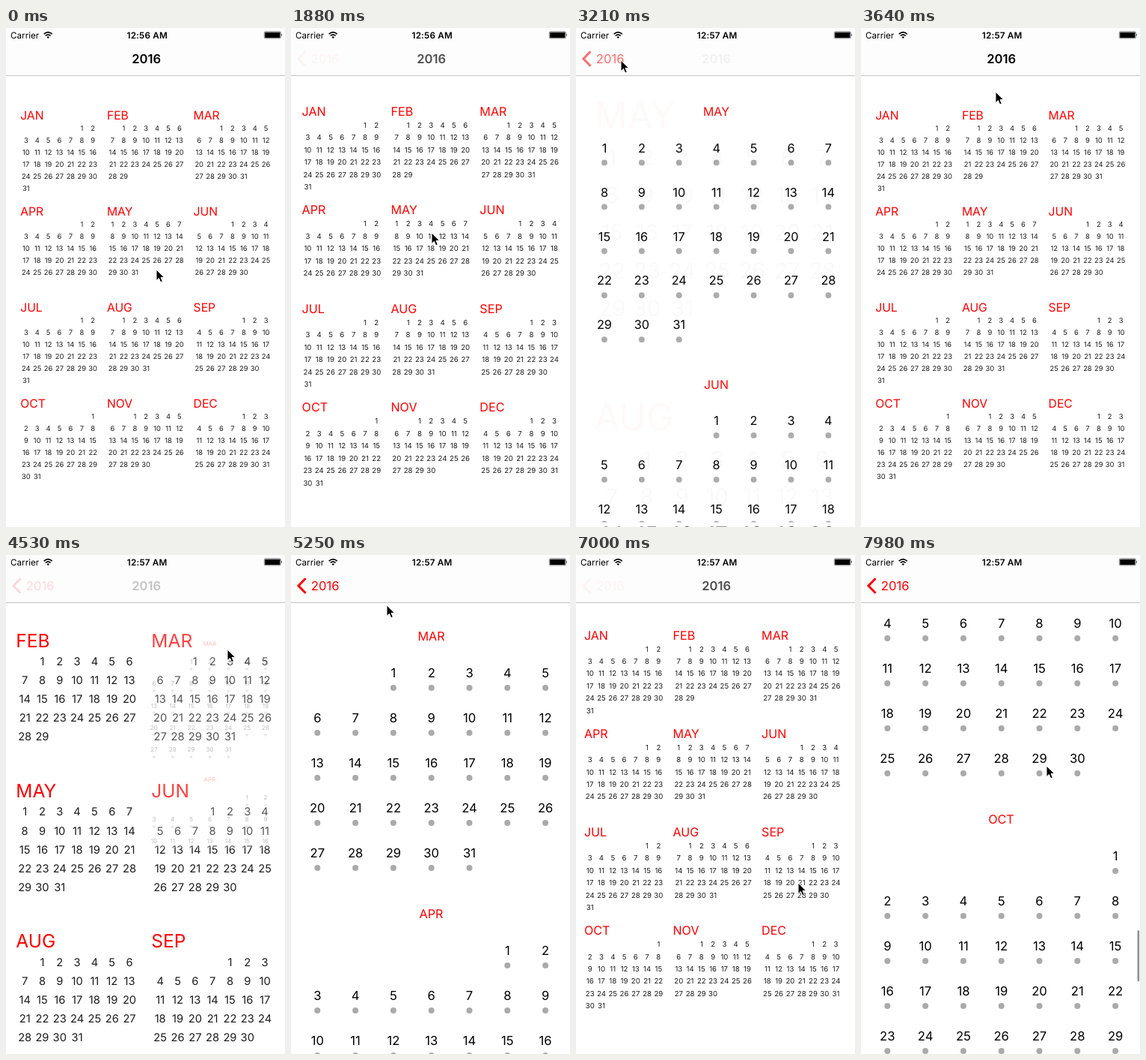
An HTML page that plays this animation: 373x665 px, repeating every 8000 ms.

```html
<!DOCTYPE html>
<html lang="en">
<head>
<meta charset="utf-8">
<title>Year calendar</title>
<style>
  html, body { margin: 0; width: 100%; height: 100%; overflow: hidden; background: #fff; }
  svg { display: block; width: 100vw; height: 100vh; }
  text { font-family: Inter, "Noto Sans", sans-serif; text-rendering: geometricPrecision; }
  .day { text-anchor: middle; }
  .small .day { font-size: 9.4px; fill: #1c1c1c; }
  .small .name { font-size: 15.7px; fill: #f00; }
  .large .day { font-size: 16.6px; }
  .large .name { font-size: 16.2px; fill: #f00; text-anchor: middle; }
  .large circle { fill: #aaa; }
  .bar { font-size: 16.6px; }
  .status { font-size: 11.7px; }
</style>
</head>
<body>
<svg viewBox="0 0 373 665">
  <defs>
    <clipPath id="page"><rect y="64" width="373" height="601"/></clipPath>
  </defs>
  <rect width="373" height="665" fill="#fff"/>
  <g id="year" class="small"></g>
  <g id="months" class="large"></g>
  <rect id="scroller" x="369.5" width="2.6" height="68" rx="1.3" fill="#909090"/>

  <rect width="373" height="63.5" fill="#fdfdfd"/>
  <rect y="63" width="373" height="1" fill="#c4c4c4"/>
  <g class="status">
    <text x="6" y="13.6">Carrier</text>
    <text id="clock" x="188.7" y="13.6" text-anchor="middle" font-weight="600" letter-spacing=".2"></text>
  </g>
  <g fill="none" stroke="#000" stroke-width="1.7">
    <path d="M50.7 8.2Q56.2 3.2 61.7 8.2"/>
    <path d="M52.8 10.4Q56.2 7.4 59.6 10.4"/>
  </g>
  <path d="M54.4 11.9Q56.2 10.4 58 11.9L56.2 13.9Z"/>
  <rect x="345.3" y="4.8" width="22" height="9" rx="1.6" fill="none" stroke="#000" stroke-width=".5"/>
  <rect x="346.2" y="5.7" width="20.2" height="7.2" rx=".6"/>
  <path d="M368.2 7.6q1.6 1.7 0 3.4z"/>
  <g class="bar">
    <text id="title" x="187.7" y="47" text-anchor="middle" font-weight="600">2016</text>
    <g id="back" fill="#f00">
      <path d="M19.5 31.3L10 41L19.5 50.7" fill="none" stroke="#f00" stroke-width="3"/>
      <text x="26.8" y="47">2016</text>
    </g>
  </g>
  <path id="cursor" d="M0 0V14.6L3.4 11.4L5.7 16.8L8.3 15.7L6 10.4H10.6Z"
        stroke="#fff" stroke-width="1" stroke-linejoin="round"/>
</svg>
<script>
const LOOP = 8000, STEP = 88.4;   // the picture advances in steps
const ZOOM_MS = 480, RATIO = 3.2;
const NAMES = 'JAN FEB MAR APR MAY JUN JUL AUG SEP OCT NOV DEC'.split(' ');
const $ = id => document.getElementById(id);

function add(parent, tag, attrs, text = '') {
  const el = document.createElementNS('http://www.w3.org/2000/svg', tag);
  for (const key in attrs) el.setAttribute(key, attrs[key]);
  el.textContent = text;
  return parent.appendChild(el);
}

// Calls draw(day, column, row) for each day and returns the number of rows.
function eachDay(month, draw) {
  const first = new Date(2016, month, 1).getDay();
  const count = new Date(2016, month + 1, 0).getDate();
  for (let d = 1; d <= count; d++) {
    const cell = first + d - 1;
    draw(d, cell % 7, Math.floor(cell / 7));
  }
  return Math.ceil((first + count) / 7);
}

function buildYear() {
  NAMES.forEach((name, m) => {
    const x = 20 + 115.7 * (m % 3), y = 116 + 128 * Math.floor(m / 3);
    add($('year'), 'text', { class: 'name', x: x - .8, y: y + 5.8 }, name);
    eachDay(m, (d, col, row) => add($('year'), 'text',
      { class: 'day', x: x + 6.8 + 14.9 * col, y: y + 21.4 + 16 * row }, d));
  });
}

function buildMonths(start) {
  const layer = add($('months'), 'g', { 'clip-path': 'url(#page)' });
  add(layer, 'rect', { y: 64, width: 373, height: 601, fill: '#fff' });
  const list = add(layer, 'g', {});
  let y = 108;
  for (let m = start; m < start + 3; m++) {
    add(list, 'text', { class: 'name', x: 187.5, y: y + 5.9 }, NAMES[m]);
    const rows = eachDay(m, (d, col, row) => {
      const x = 35.3 + 50.8 * col, cy = y + 49 + 60 * row;
      add(list, 'text', { class: 'day', x, y: cy + 6 }, d);
      add(list, 'circle', { cx: x, cy: cy + 20, r: 4 });
    });
    y += 70 + 60 * rows;
  }
  return { layer, list };
}

// Each visit zooms into a month, then back out; yearAt and monthAt are the fixed points.
const visits = [
  { month: 4, enter: 1842, leave: 3152, yearAt: [186.5, 304], monthAt: [186.5, 313] },
  { month: 2, enter: 4364, leave: 5662, yearAt: [350.3, 120], monthAt: [353.5, 127.5] },
  { month: 8, enter: 6971, leave: Infinity, yearAt: [350.3, 488], monthAt: [353.5, 500] }
];

const clamp = v => Math.min(1, Math.max(0, v));

// cubic-bezier(.42, 0, .58, 1)
function easeInOut(x) {
  if (x <= 0 || x >= 1) return clamp(x);
  let lo = 0, hi = 1, u;
  for (let i = 0; i < 20; i++) {
    u = (lo + hi) / 2;
    const bx = 1.26 * u * (1 - u) ** 2 + 1.74 * u * u * (1 - u) + u ** 3;
    if (bx < x) lo = u; else hi = u;
  }
  return u * u * (3 - 2 * u);
}

// Keys are [time, value, value...]; linear unless an ease is given.
function track(keys, t, ease = v => v) {
  let i = 0;
  while (i < keys.length - 2 && t >= keys[i + 1][0]) i++;
  const [a, b] = [keys[i], keys[i + 1]];
  const k = ease(clamp((t - a[0]) / (b[0] - a[0])));
  return a.slice(1).map((v, j) => v + (b[j + 1] - v) * k);
}

const POINTER = [
  [0, 201, 322], [180, 188, 277], [350, 188, 277], [440, 188, 273],
  [2420, 188, 273], [3130, 60, 43], [3290, 60, 43], [4000, 296, 126],
  [4800, 296, 126], [5500, 60, 43], [5690, 60, 43], [5950, 145, 456],
  [6560, 297, 437], [7400, 297, 437], [7620, 248, 281]
];
const SCROLL = [[7715, 0], [7803, 20], [7892, 70], [7980, 126]];
const FADE_OUT = [[0, 1], [.075, .7], [.12, .55], [.35, .22], [.6, .16], [1, 0]];
const FADE_IN = [[0, 0], [.075, .04], [.12, .05], [.35, .14], [.6, .22], [1, 1]];

const zoomAt = ([x, y], s) =>
  `translate(${x * (1 - s)} ${y * (1 - s)}) scale(${s})`;

function render(t) {
  let yearZoom = '', titleAlpha = 1, backAlpha = 0;
  const [scroll] = track(SCROLL, t);

  for (const v of visits) {
    const active = t > v.enter && t < v.leave + ZOOM_MS;
    v.layer.setAttribute('display', active ? 'inline' : 'none');
    if (!active) continue;
    const leaving = t >= v.leave;
    const tau = clamp((t - (leaving ? v.leave : v.enter)) / ZOOM_MS);
    const p = leaving ? 1 - easeInOut(tau) : easeInOut(tau);
    const scale = 1 + p * (RATIO - 1);
    yearZoom = zoomAt(v.yearAt, scale);
    v.layer.setAttribute('transform', zoomAt(v.monthAt, scale / RATIO));
    v.layer.setAttribute('opacity', p);
    v.list.setAttribute('transform', `translate(0 ${-scroll})`);
    const [gone] = track(FADE_OUT, tau), [come] = track(FADE_IN, tau);
    [titleAlpha, backAlpha] = leaving ? [come, gone] : [gone, come];
  }

  $('year').setAttribute('transform', yearZoom);
  $('title').setAttribute('opacity', titleAlpha);
  $('back').setAttribute('opacity', backAlpha);
  $('scroller').setAttribute('y', 486 + scroll * .113);
  $('scroller').setAttribute('opacity', clamp(scroll / 20));
  $('clock').textContent = t < 2100 ? '12:56 AM' : '12:57 AM';
  const [x, y] = track(POINTER, t, easeInOut);
  $('cursor').setAttribute('transform', `translate(${x} ${y})`);
}

buildYear();
for (const v of visits) Object.assign(v, buildMonths(v.month));

function tick() {
  const t = performance.now() % LOOP;
  render(Math.max(0, Math.floor((t - 15) / STEP) * STEP + 24));
  requestAnimationFrame(tick);
}
tick();
</script>
</body>
</html>
```
